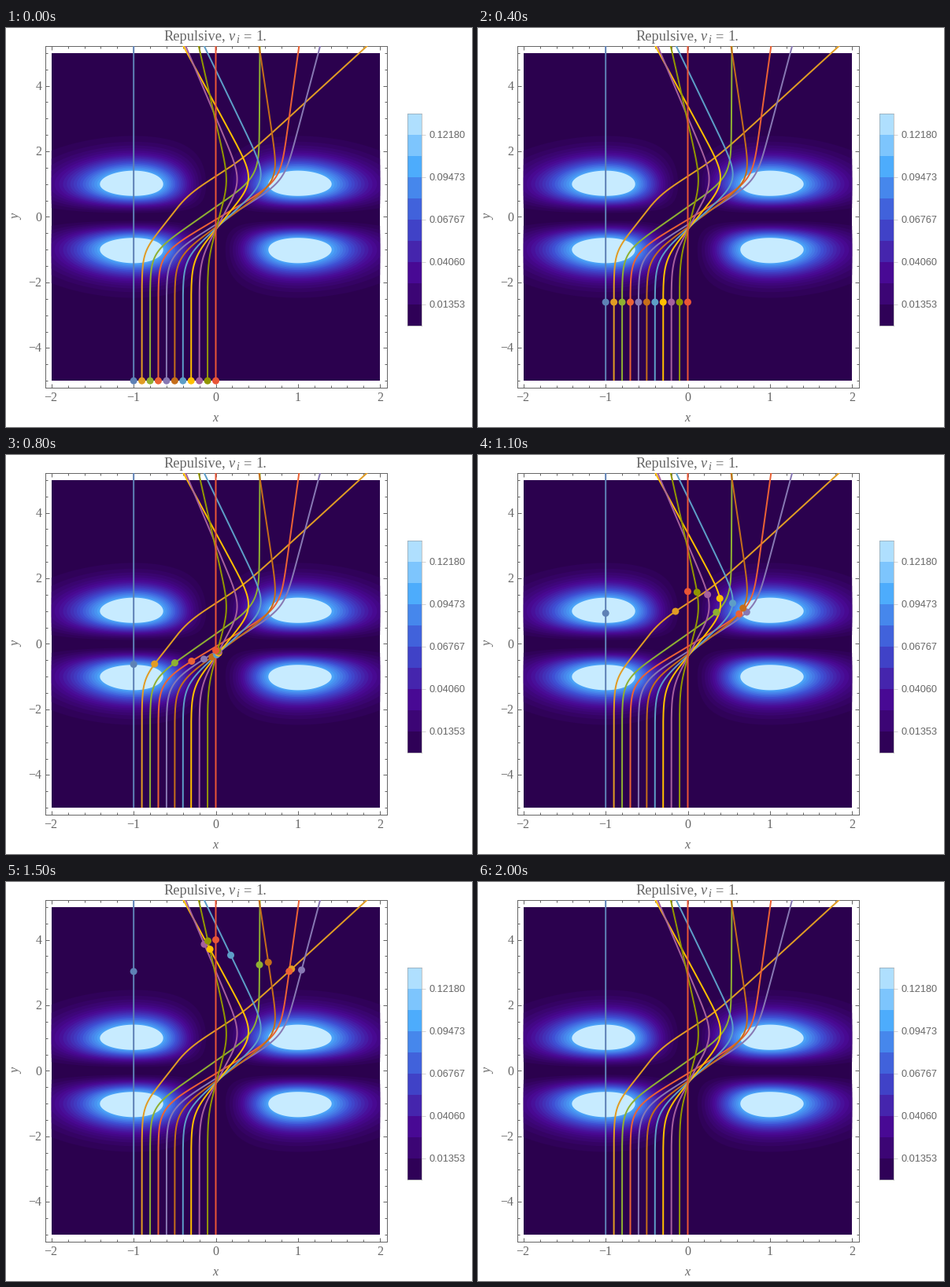
A matplotlib script that plays this animation: 592x508 px, repeating every 6.7 s.

```python
import numpy as np
import matplotlib.pyplot as plt
from matplotlib.animation import FuncAnimation
from matplotlib.colors import LinearSegmentedColormap
from matplotlib.patches import Rectangle

W, H, DPI = 592, 508, 64
PX = 72 / DPI  # points per pixel
GRAY = "#666666"
STRENGTH = 2
PEAK = np.exp(-2)
FRAME_TIME, STEPS_PER_FRAME, MOVING_FRAMES = 0.6, 60, 20
COLORS = ["#5e81b5", "#e19c24", "#8fb032", "#eb6235", "#8778b3", "#c56e1a",
          "#5d9ec7", "#ffbf00", "#a5609d", "#929600", "#e95536"]
deep_sea = LinearSegmentedColormap.from_list(
    "deep_sea", ["#290049", "#490994", "#3f50d4", "#4cacfc", "#c7ebff"])


def potential(x, y):
    return x**2 * y**2 * np.exp(-x**2 - y**2)


def derivative(state):
    x, y, vx, vy = state
    push = -2 * STRENGTH * x * y * np.exp(-x**2 - y**2)
    return np.array([vx, vy, push * y * (1 - x**2), push * x * (1 - y**2)])


def trajectories():
    """Positions with shape (step, axis, particle), integrated with RK4."""
    x = np.arange(-10, 1) / 10
    state = np.array([x, np.full_like(x, -5), np.zeros_like(x), np.ones_like(x)])
    dt = FRAME_TIME / STEPS_PER_FRAME
    path = [state[:2]]
    for _ in range(STEPS_PER_FRAME * MOVING_FRAMES):
        k1 = derivative(state)
        k2 = derivative(state + dt / 2 * k1)
        k3 = derivative(state + dt / 2 * k2)
        k4 = derivative(state + dt * k3)
        state = state + dt / 6 * (k1 + 2 * k2 + 2 * k3 + k4)
        path.append(state[:2])
    return np.array(path)


fig = plt.figure(figsize=(W / DPI, H / DPI), dpi=DPI, facecolor="white")


def pixel_axes(left, top, right, bottom):
    return fig.add_axes([left / W, 1 - bottom / H,
                         (right - left) / W, (bottom - top) / H])


def label(x, y, text, size=16, font="Liberation Serif", **style):
    style = {"va": "baseline", "color": GRAY, **style}
    fig.text(x / W, 1 - y / H, text, fontsize=size * PX, family=font, **style)


def draw_field(ax):
    ax.add_patch(Rectangle((-2, -5), 4, 10, lw=0, color=deep_sea(0.0025 / PEAK)))
    x, y = np.meshgrid(np.linspace(-2, 2, 241), np.linspace(-5, 5, 401))
    v = potential(x, y)
    for i in range(1, 21):
        level = i * 0.005
        shade = 1.0 if i == 20 else (level + 0.0025) / PEAK
        ax.contourf(x, y, v, levels=[level, 1], colors=[deep_sea(shade)],
                    antialiased=True)


def draw_frame(ax):
    ax.set(xlim=(-2.08, 2.08), ylim=(-5.2, 5.2))
    ax.set_xticks(np.arange(-2, 3))
    ax.set_yticks(np.arange(-4, 5, 2))
    ax.set_xticks(np.arange(-10, 11) / 5, minor=True)
    ax.set_yticks(np.arange(-10, 11) / 2, minor=True)
    for which, length in (("major", 5), ("minor", 3)):
        ax.tick_params(which=which, direction="in", top=True, right=True,
                       length=length * PX, width=PX, color=GRAY,
                       labelbottom=False, labelleft=False)
    for spine in ax.spines.values():
        spine.set(color=GRAY, linewidth=PX)


def draw_labels():
    for n in range(-2, 3):
        text = str(n).replace("-", "\u2212")
        label(266.5 + 104.3 * n - (4 if n < 0 else 0) * 0.25, 475, text, ha="center")
        label(45.5, 245.5 - 83.4 * n, str(2 * n).replace("-", "\u2212"), ha="right")
    label(266, 501, "x", style="italic", ha="center")
    label(13, 240, "y", style="italic", ha="center", va="center", rotation=90)
    label(200, 16, "Repulsive,", 18.4)
    label(283, 16, "v", 18.4, style="italic")
    label(292, 19, "i", 14, style="italic")
    label(301.5, 16, "=", 18.4)
    label(317, 16, "1.", 18.4)


def draw_legend():
    bar = pixel_axes(510, 109, 528, 379)
    shades = deep_sea((np.arange(10) + 0.5) / 10)
    bar.imshow(shades[:, None, :], origin="lower", extent=(0, 1, 0, 10),
               aspect="auto", interpolation="nearest")
    bar.set_xticks([])
    bar.set_yticks(np.arange(1, 10, 2))
    bar.yaxis.tick_right()
    bar.tick_params(length=5 * PX, width=0.6 * PX, color="#b8b8b8", labelright=False)
    for spine in bar.spines.values():
        spine.set(color="#8c8c8c", linewidth=0.5 * PX)
    for n in range(1, 10, 2):
        label(537, 383.5 - 27 * n, f"{n * PEAK / 10:.5f}", 12.8, "Liberation Sans")


ax = pixel_axes(49.5, 23.5, 483.5, 457.5)
draw_field(ax)
draw_frame(ax)
draw_labels()
draw_legend()

path = trajectories()
for particle, color in enumerate(COLORS):
    ax.plot(path[:, 0, particle], path[:, 1, particle], color=color,
            lw=2 * PX, solid_capstyle="butt", zorder=3)
dots = ax.scatter(path[0, 0], path[0, 1], s=(9 * PX)**2, c=COLORS,
                  linewidths=0, zorder=4)


def update(frame):
    step = min(frame, MOVING_FRAMES) * STEPS_PER_FRAME
    dots.set_offsets(path[step].T)
    return [dots]


animation = FuncAnimation(fig, update, frames=67, interval=100,
                          repeat=True, repeat_delay=0)
plt.show()
```
